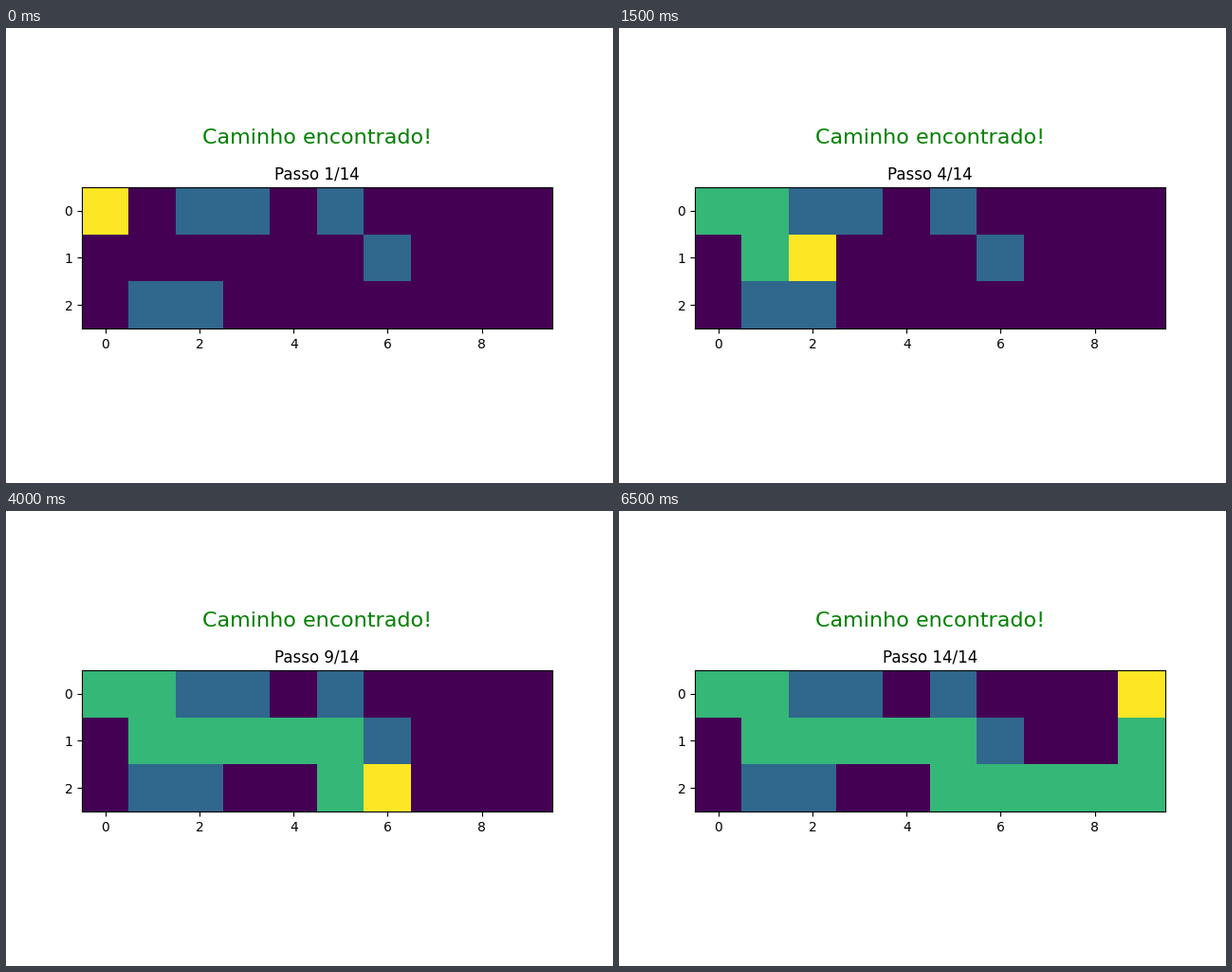
A matplotlib script for the animation above (7000 ms loop, 640 px wide and 480 px high).

```python
import numpy as np
import matplotlib.pyplot as plt
from matplotlib.animation import FuncAnimation

FREE, WALL, VISITED, CURRENT = range(4)

walls = [(0, 2), (0, 3), (0, 5), (1, 6), (2, 1), (2, 2)]
path = ([(0, 0), (0, 1)]
        + [(1, col) for col in range(1, 6)]
        + [(2, col) for col in range(5, 10)]
        + [(1, 9), (0, 9)])

maze = np.full((3, 10), FREE)
for cell in walls:
    maze[cell] = WALL


def grid_at(step):
    grid = maze.copy()
    for cell in path[:step]:
        grid[cell] = VISITED
    grid[path[step]] = CURRENT
    return grid


fig, ax = plt.subplots(figsize=(6.4, 4.8), dpi=100)
image = ax.imshow(grid_at(0), cmap="viridis", vmin=FREE, vmax=CURRENT,
                  interpolation="nearest")
title = ax.set_title("")
ax.text(0.5, 1.307, "Caminho encontrado!", transform=ax.transAxes,
        ha="center", fontsize=16, color="green")


def update(step):
    image.set_data(grid_at(step))
    title.set_text(f"Passo {step + 1}/{len(path)}")
    return image, title


anim = FuncAnimation(fig, update, frames=len(path), interval=500, repeat=True,
                     repeat_delay=0)
plt.show()
```
